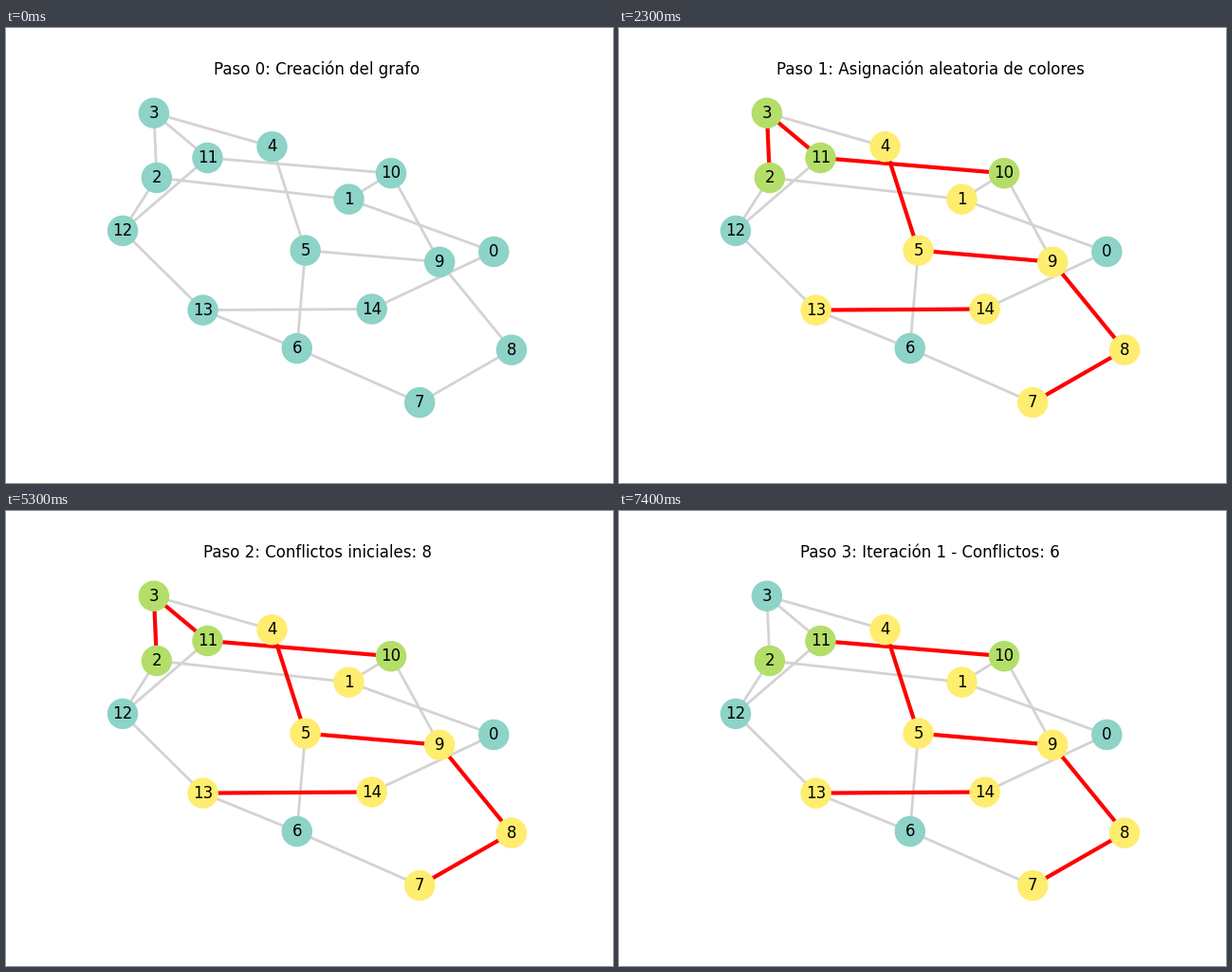
These frames come from a looping animation (640x480 px, 8 s). A matplotlib script:

```python
import matplotlib.pyplot as plt
from matplotlib.animation import FuncAnimation
from matplotlib.collections import LineCollection

TEAL, GREEN, YELLOW = "#8dd3c7", "#b3de69", "#ffed6f"
STEP_MS = 500
FRAMES = 16
HOLD = 6  # frames per step after the short opening

# Node centres in stage pixels, y pointing down
NODES = [(514.3, 236), (361.5, 180.6), (158.9, 158), (155.9, 89.7),
         (280.5, 125.2), (315.6, 234.6), (306.8, 338), (436.2, 395.1),
         (533, 339.6), (457.2, 246.8), (406, 153.2), (212.5, 137),
         (123, 213.9), (207.6, 297.6), (385.7, 296.5)]
COUNT = len(NODES)
RING = [(i, (i + 1) % COUNT) for i in range(COUNT)]
CHORDS = [(1, 10), (2, 12), (3, 11), (5, 9), (6, 13)]
EDGES = RING + CHORDS


def initial_color(node):
    if node % 6 == 0:
        return TEAL
    return GREEN if node % 8 in (2, 3) else YELLOW


def find_conflicts(colors):
    return [(a, b) for a, b in EDGES if colors[a] == colors[b]]


def segments(edges):
    return [(NODES[a], NODES[b]) for a, b in edges]


start = [initial_color(i) for i in range(COUNT)]
fixed = start.copy()
fixed[3] = TEAL
start_bad, fixed_bad = find_conflicts(start), find_conflicts(fixed)

# Title, node colours, highlighted edges
STEPS = [
    ("Creación del grafo", [TEAL] * COUNT, []),
    ("Asignación aleatoria de colores", start, start_bad),
    (f"Conflictos iniciales: {len(start_bad)}", start, start_bad),
    (f"Iteración 1 - Conflictos: {len(fixed_bad)}", fixed, fixed_bad),
]

fig, ax = plt.subplots(figsize=(6.4, 4.8), dpi=100)
fig.subplots_adjust(left=0.125, right=0.9, bottom=0.11, top=0.88)
# Limits match the axes box, so data units are stage pixels
ax.set_xlim(80, 576)
ax.set_ylim(427.2, 57.6)
ax.axis("off")


def add_lines(color, width, zorder):
    lines = LineCollection([], colors=color, linewidths=width, zorder=zorder)
    return ax.add_collection(lines, autolim=False)


gray_lines = add_lines("lightgray", 2, 1)
red_lines = add_lines("red", 3, 1.5)
dots = ax.scatter(*zip(*NODES), s=500, c=start, zorder=2)
for i, (x, y) in enumerate(NODES):
    ax.text(x, y, str(i), size=12, ha="center", va="center", zorder=3)
title = ax.set_title("", fontsize=12)


def draw(frame):
    step = (frame + HOLD - 1) // HOLD
    text, colors, bad = STEPS[step]
    title.set_text(f"Paso {step}: {text}")
    dots.set_facecolor(colors)
    dots.set_edgecolor(colors)
    gray_lines.set_segments(segments(e for e in EDGES if e not in bad))
    red_lines.set_segments(segments(bad))
    return gray_lines, red_lines, dots, title


anim = FuncAnimation(fig, draw, frames=FRAMES, interval=STEP_MS,
                     repeat=True, repeat_delay=0, blit=False)
plt.show()
```
